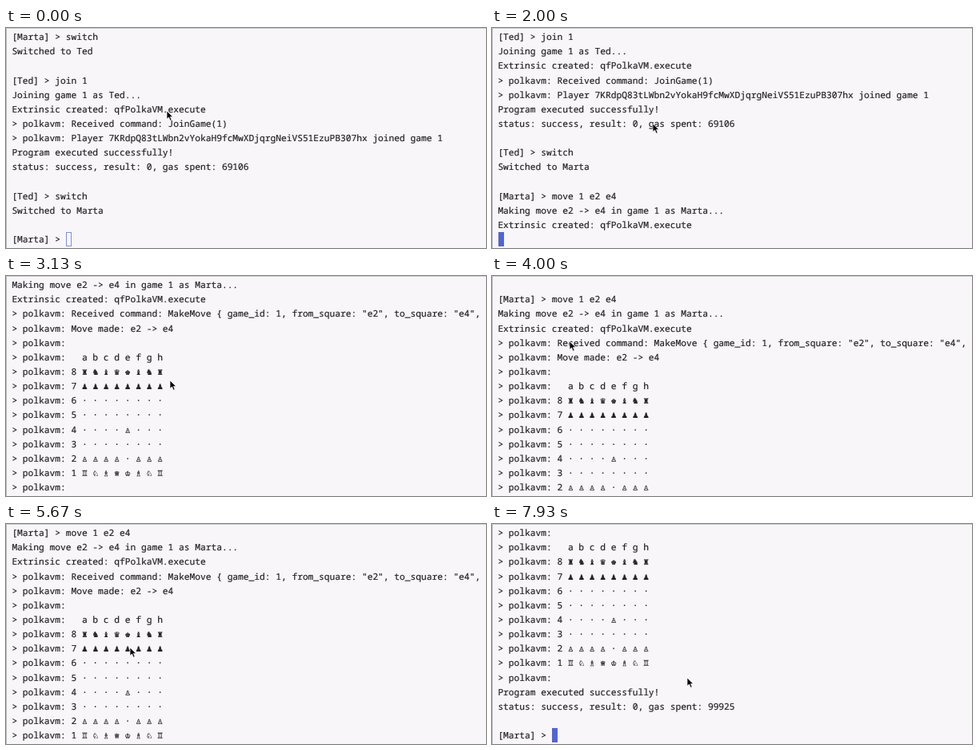
Write an HTML page that moves like this. It is 600 px wide and 276 px high and loops after 8 s.

```html
<!DOCTYPE html>
<html lang="en">
<head>
<meta charset="utf-8">
<title>Terminal chess</title>
<style>
html, body { margin: 0; width: 100%; height: 100%; overflow: hidden; background: #f8f6f9; }
#stage {
  position: relative; width: 600px; height: 276px; overflow: hidden;
  background: #f8f6f9; color: #232227; -webkit-text-stroke: .2px;
  font: 11.22px/18.14px "Noto Sans Mono", "DejaVu Sans Mono", monospace;
  text-rendering: geometricPrecision; font-variant-ligatures: none;
}
#stage::after {
  content: ""; position: absolute; inset: 0;
  border-top: 1px solid #cbcacd; border-left: 1px solid #b9b8bc;
}
.row { position: absolute; left: 7.4px; height: 18.14px; white-space: pre; }
#caret {
  position: absolute; width: 7px; height: 18px; box-sizing: border-box;
  border: 1px solid #7d90d8;
}
#caret.focus { background: #5264d4; border-color: #5264d4; }
#mouse { position: absolute; left: 0; top: 0; overflow: visible; }
</style>
</head>
<body>
<div id="stage">
  <div id="caret"></div>
  <svg id="mouse" width="9" height="14">
    <path d="M0 0V10.2L2.5 8L4.3 12.2L6.1 11.4L4.4 7.4H7.6Z" fill="#000" stroke="#fff" stroke-width=".7"/>
  </svg>
</div>
<script>
const ROWS = 15, PITCH = 18.14, TOP = 3.2, LEFT = 8, CHAR = 6.732;
const RATE = 15, TICKS = 8 * RATE;
const vm = s => '> polkavm: ' + s;
const spread = s => [...s].join(' ');
const ranks = ['♜♞♝♛♚♝♞♜', '♟♟♟♟♟♟♟♟', '········', '········',
               '····♙···', '········', '♙♙♙♙·♙♙♙', '♖♘♗♕♔♗♘♖'];
const PROMPT = '[Marta] > ', COMMAND = 'move 1 e2 e4', PROMPT_LINE = 14;
const lines = [
  PROMPT + 'switch', 'Switched to Ted', '',
  '[Ted] > join 1', 'Joining game 1 as Ted...', 'Extrinsic created: qfPolkaVM.execute',
  vm('Received command: JoinGame(1)'),
  vm('Player 7KRdpQ83tLWbn2vYokaH9fcMwXDjqrgNeiVS51EzuPB307hx joined game 1'),
  'Program executed successfully!', 'status: success, result: 0, gas spent: 69106', '',
  '[Ted] > switch', 'Switched to Marta', '',
  PROMPT + COMMAND, 'Making move e2 -> e4 in game 1 as Marta...',
  'Extrinsic created: qfPolkaVM.execute',
  vm('Received command: MakeMove { game_id: 1, from_square: "e2", to_square: "e4",'),
  vm('Move made: e2 -> e4'), vm(''), vm('  ' + spread('abcdefgh')),
  ...ranks.map((r, i) => vm(`${8 - i} ${spread(r)}`)),
  vm(''), 'Program executed successfully!', 'status: success, result: 0, gas spent: 99925', '',
  PROMPT
];

// All times are in ticks of 1/15 s.
const FOCUS = 4, TYPED = 13, ENTER = 30, DONE = 37;
const ramp = (n, from, to) => Math.min(1, Math.max(0, (n - from) / (to - from)));

// First visible line: output scrolls in, then the user scrolls up and back down.
const topLine = n => Math.round(
  (n >= ENTER ? 3 : 0) + 16 * ramp(n, ENTER, DONE) - 6 * ramp(n, 45, 48) +
  4 * ramp(n, 84, 86) ** 2 + 2 * ramp(n, 114, 117));

// Pointer glides: start, end, x, y and how far it swings past both ends.
const glides = [
  [0, 2, 201, 120], [45, 47, 205, 131], [50, 60, 97, 82, .55], [63, 73, 210, 105, .32],
  [76, 82, 155, 155], [87, 92, 113, 70], [92, 98, 154, 207], [99, 101, 202, 189],
  [114, 119, 244, 193]
];
const mouseAt = n => glides.reduce(([x, y], [from, to, x2, y2, swing = 0]) => {
  const p = ramp(n, from, to), k = p - swing * Math.sin(2 * Math.PI * p);
  return [x + (x2 - x) * k, y + (y2 - y) * k];
}, [201, 104]);

const stage = document.getElementById('stage');
const caret = document.getElementById('caret');
const mouse = document.getElementById('mouse');
const rows = Array.from({ length: ROWS }, (_, i) => {
  const row = document.createElement('div');
  row.className = 'row';
  row.style.top = TOP + i * PITCH + 'px';
  stage.insertBefore(row, mouse);
  return row;
});

function draw(n) {
  const top = topLine(n), printing = n >= ENTER && n < DONE;
  const caretLine = n < ENTER ? PROMPT_LINE : printing ? top + ROWS - 1 : lines.length - 1;
  const visible = k => printing && k === caretLine ? '' :
    k === PROMPT_LINE && n < TYPED ? PROMPT : lines[k];
  rows.forEach((row, i) => row.textContent = visible(top + i));
  caret.style.left = LEFT + visible(caretLine).length * CHAR + 'px';
  caret.style.top = 2 + (caretLine - top) * PITCH + 'px';
  caret.className = n < FOCUS ? '' : 'focus';
  const [x, y] = mouseAt(n);
  mouse.style.transform = `translate(${x}px, ${y}px)`;
}

const start = performance.now();
let shown = -1;
function tick() {
  // The small lead absorbs the rounding of tick times.
  const n = Math.floor((performance.now() - start + 4) * RATE / 1000) % TICKS;
  if (n !== shown) draw(shown = n);
  requestAnimationFrame(tick);
}
tick();
</script>
</body>
</html>
```
